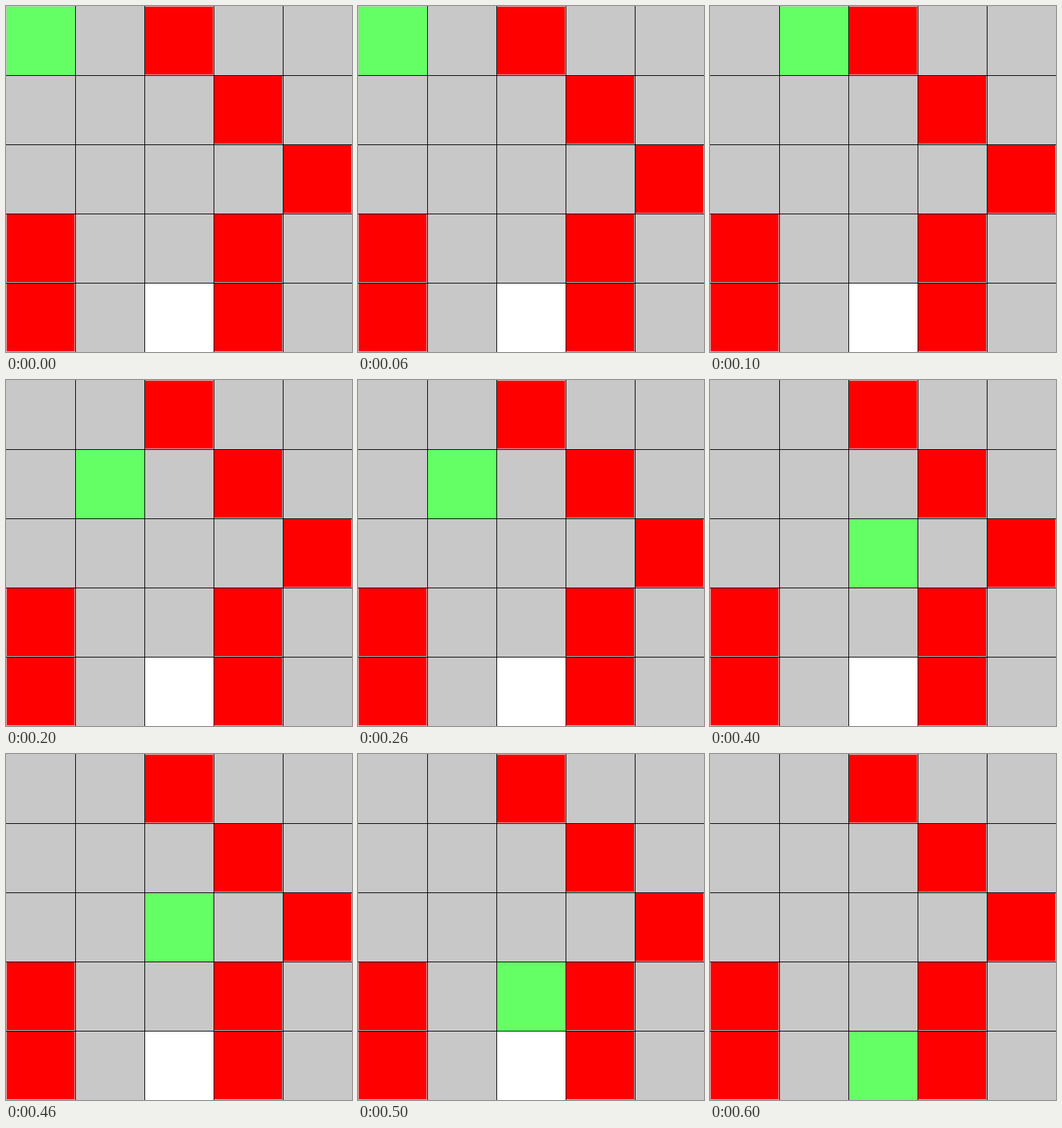
Write an HTML page with a canvas that moves like this. It is 500 px wide and 500 px high and loops after 700 ms.

```html
<!DOCTYPE html>
<html lang="en">
<head>
<meta charset="utf-8">
<title>Grid walk</title>
<style>
html, body { margin: 0; width: 100%; height: 100%; overflow: hidden; background: #c8c8c8; }
canvas { display: block; }
</style>
</head>
<body>
<canvas id="stage" width="500" height="500"></canvas>
<script>
const ctx = document.getElementById('stage').getContext('2d');
const CELL = 100, COUNT = 5, SIZE = CELL * COUNT, STEP = 100;
const walls = [[2, 0], [3, 1], [4, 2], [0, 3], [3, 3], [0, 4], [3, 4]];
const goal = [2, 4];
const path = [[0, 0], [1, 0], [1, 1], [2, 1], [2, 2], [2, 3], goal];

function fillCell([col, row], color, size) {
  ctx.fillStyle = color;
  ctx.fillRect(col * CELL + 1, row * CELL + 1, size, size);
}

function draw(time) {
  ctx.fillStyle = '#c8c8c8';
  ctx.fillRect(0, 0, SIZE, SIZE);
  ctx.fillStyle = '#000';
  for (let p = CELL; p < SIZE; p += CELL) {
    ctx.fillRect(p, 0, 1, SIZE);
    ctx.fillRect(0, p, SIZE, 1);
  }
  for (const wall of walls) fillCell(wall, '#f00', 98);
  fillCell(goal, '#fff', 99);
  const step = Math.floor(time / STEP) % path.length;
  fillCell(path[step], '#64ff64', 99);
}

const start = performance.now();
function tick() {
  draw(performance.now() - start);
  requestAnimationFrame(tick);
}
tick();
</script>
</body>
</html>
```
